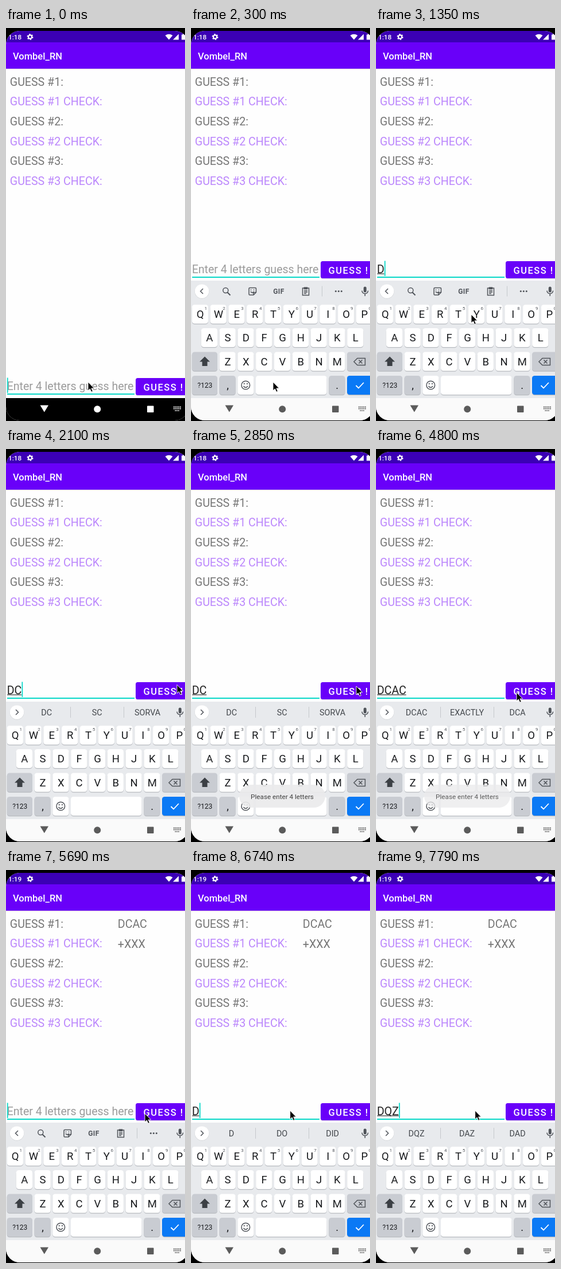
These frames come from a looping animation (312x686 px, 8 s). An HTML page:

```html
<!DOCTYPE html>
<html lang="en">
<head>
<meta charset="utf-8">
<title>Word guess</title>
<style>
  html, body { margin: 0; width: 100%; height: 100%; overflow: hidden; background: #000; }
  svg { display: block; width: 312px; height: 686px; font-family: Roboto, sans-serif; }
  .medium { font-weight: 500; }
  .mid { text-anchor: middle; }
  .line { fill: none; stroke: #50545a; stroke-width: 1.5; }
</style>
</head>
<body>
<svg id="stage" viewBox="0 0 312 686">
  <defs><clipPath id="screen"><rect y="5" width="318" height="680" rx="24"/></clipPath></defs>
  <rect width="312" height="686" fill="#000"/>
  <g clip-path="url(#screen)">
    <rect width="312" height="686" fill="#fefefe"/>
    <rect y="5" width="312" height="20.500" fill="#3b00b5"/>
    <rect y="71" width="312" height="1" fill="#000" opacity=".12"/>
    <rect y="25" width="312" height="46" fill="#6900f9"/>
    <g fill="#fff">
      <text id="clock" x="4" y="20" font-size="11.7" class="medium"></text>
      <circle cx="42" cy="15.500" r="3.100" fill="none" stroke="#fff" stroke-width="2.200"/>
      <circle cx="42" cy="15.500" r="4.700" fill="none" stroke="#fff" stroke-width="1.600" stroke-dasharray="2.4 2.52"/>
      <path d="M277.500 13Q284 8.500 290.500 13L284 20.500ZM291 20.500L301 10.500V20.500ZM306 11.500h2v-1.300h5v10.300h-7Z"/>
      <text x="12" y="54.500" font-size="16.500" class="medium">Vombel_RN</text>
    </g>
    <g id="rows" font-size="19.6"></g>
    <g id="nav">
      <rect id="navBack" y="646" width="312" height="40"/>
      <g id="navIcons">
        <path d="M59.500 658.500H74L66.800 670.500Z"/>
        <circle cx="159.200" cy="665.300" r="6"/>
        <rect x="246" y="659.500" width="11.500" height="11.500" rx="1"/>
        <path d="M292 661.500h13M292 664.500h13M294.500 667.800h8" fill="none" stroke-width="1.800" stroke-dasharray="1.700 1.100"/>
      </g>
    </g>
    <g id="keyboard">
      <rect y="441" width="312" height="205" fill="#e8eaed"/>
      <circle cx="19" cy="460" r="12.500" fill="#c9cbcf"/>
      <circle cx="19" cy="459.500" r="12.300" fill="#fff"/>
      <path id="chevron" class="line"/>
      <g id="tools" class="line">
        <circle cx="60.300" cy="458" r="4.500"/><path d="M63.500 461.500L68.500 466.500" stroke-width="2"/>
        <path d="M102.500 453.500h9.500q1.500 0 1.500 1.500v6.500l-4.500 4.500h-6.500q-1.500 0-1.500-1.500v-9.500q0-1.500 1.500-1.500ZM113.500 461.500h-4.500v4.500M104 460q3 4 5.500 0M104.500 456.500v1.500M109.500 456.500v1.500"/>
        <path d="M194.500 454h11v12.500h-11ZM197.500 453h5v2.500h-5ZM197 458.500h6M197 461h6M197 463.500h4"/>
        <path d="M228.500 450.500v18" stroke="#c5c8cc" stroke-width="1"/>
        <text x="153" y="463.500" font-size="12" font-weight="700" class="mid" fill="#50545a" stroke="none" letter-spacing=".4">GIF</text>
        <g fill="#50545a" stroke="none"><circle cx="252.300" cy="459.500" r="1.500"/><circle cx="257.300" cy="459.500" r="1.500"/><circle cx="262.300" cy="459.500" r="1.500"/></g>
      </g>
      <g id="words" font-size="14.400" fill="#43474c" class="mid">
        <path d="M112.500 450v19M205.500 450v19" stroke="#c5c8cc"/>
      </g>
      <rect x="300.800" y="451.500" width="5" height="10" rx="2.500" fill="#50545a"/>
      <path d="M298 458.500a5.300 5.300 0 0 0 10.600 0M303.300 464v4" class="line"/>
      <g id="keys"></g>
      <path d="M24 573.500L33 582.500H28.500V590H19.500V582.500H15Z" fill="#3c4045"/>
      <path d="M290 576.500h13.500v12H290l-6-6ZM292.500 579.500l6 6M298.500 579.500l-6 6" class="line"/>
      <g class="line"><circle cx="95.300" cy="623.500" r="7.300"/><path d="M91.500 625q3.800 5 7.600 0"/><path d="M92.700 620v2M97.900 620v2" stroke-width="1.800"/></g>
      <path d="M287.500 624L292 628.500L301 619" fill="none" stroke="#fff" stroke-width="1.800"/>
    </g>
    <g id="entry">
      <text id="hint" x="1.700" y="427.500" font-size="19.550" fill="#9b9b9b">Enter 4 letters guess here</text>
      <text id="typed" x="1.700" y="427.500" font-size="19.600" fill="#222"></text>
      <rect id="compose" x="2" y="428.500" height="1.200" fill="#333"/>
      <rect x="2" y="434" width="222" height="2" fill="#08d8c8"/>
      <rect id="caret" y="406.500" width="1.800" height="26.500" fill="#08d8c8"/>
      <rect x="226" y="408" width="92" height="30" rx="3.500" fill="#bbb" opacity=".4"/>
      <rect x="226" y="407" width="92" height="30" rx="3.500" fill="#6900f9"/>
      <rect id="ripple" x="226" y="407" width="92" height="30" rx="3.500" fill="#fff"/>
      <text x="239.500" y="428.500" font-size="16.500" letter-spacing="1.470" fill="#fff" class="medium">GUESS !</text>
    </g>
    <g id="toast">
      <rect x="84" y="586" width="150" height="40" rx="20" fill="#ebebec"/>
      <text x="159" y="610.500" font-size="11.700" fill="#2c2c2c" class="mid">Please enter 4 letters</text>
    </g>
    <path id="mouse" d="M0 0V15L3.400 11.800L5.800 17.300L8.300 16.200L5.900 10.900H10.600Z" fill="#000" stroke="#fff" stroke-width=".9"/>
  </g>
</svg>
<script>
const NS = 'http://www.w3.org/2000/svg';
const LOOP = 8000;
const $ = id => document.getElementById(id);

function add(parent, tag, attrs, text = '') {
  const el = document.createElementNS(NS, tag);
  for (const k in attrs) el.setAttribute(k, attrs[k]);
  el.textContent = text;
  return parent.appendChild(el);
}

// Guess list
for (let i = 0; i < 6; i++) {
  const label = `GUESS #${(i >> 1) + 1}` + (i % 2 ? ' CHECK:' : ':');
  add($('rows'), 'text', { x: 6.8, y: 100.8 + i * 34.6, fill: i % 2 ? '#bb86fc' : '#757575' }, label);
}
const result = add($('rows'), 'g', { fill: '#757575' });
add(result, 'text', { x: 194.8, y: 101.2 }, 'DCAC');
add(result, 'text', { x: 194.8, y: 135.9 }, '+XXX');

// Keyboard
const PITCH = 31.8, GREY = '#c9ccd2';
function key(x, y, w, label = '', fill = '#fff', size = 18.5) {
  const g = $('keys');
  add(g, 'rect', { x, y: y + 1.2, width: w, height: 33, rx: 4.5, fill: '#b8bbc0' });
  add(g, 'rect', { x, y, width: w, height: 33, rx: 4.5, fill });
  if (label) add(g, 'text', { x: x + w / 2 + .4, y: y + 16.5 + size * .36, 'font-size': size, fill: '#17191c', class: 'mid' }, label);
}
function keyRow(letters, x, y) {
  [...letters].forEach((c, i) => key(x + i * PITCH, y, 28.2, c));
}
keyRow('QWERTYUIOP', 1.7, 483);
keyRow('ASDFGHJKL', 17.8, 524);
keyRow('ZXCVBNM', 49.5, 565.5);
for (let i = 0; i < 10; i++)
  add($('keys'), 'text', { x: 25.8 + i * PITCH, y: 491.5, 'font-size': 8, fill: '#50545a', class: 'mid' }, (i + 1) % 10);
key(1.7, 565.5, 44.3, '', GREY);
key(272, 565.5, 46, '', GREY);
key(1.7, 607, 44.3, '?123', GREY, 12);
key(49.5, 607, 28.2, ',', GREY);
key(81.3, 607, 28.2);
key(113, 607, 123.5);
key(240.3, 607, 28.2, '.', GREY);
key(272, 607, 46, '', '#0a79f5');

const words = [70.6, 158.6, 246.6].map(x => add($('words'), 'text', { x, y: 465 }));

// Each step lists only what changes: pos = pointer, under = underlined letters
const steps = [
  [0, { open: 0, caret: 1, pos: [143, 618], text: '', under: 0, words: '', toast: 0, ripple: 0, done: 0, clock: '1:18' }],
  [300, { open: 1, caret: 0 }],
  [750, { caret: 1, pos: [145, 608] }],
  [900, { pos: [146, 566] }],
  [1050, { pos: [143, 522] }],
  [1350, { text: 'D', under: 1, pos: [166, 500] }],
  [1500, { words: 'D DO DID', pos: [198, 474] }],
  [1650, { pos: [236, 448] }],
  [1800, { text: 'DC', pos: [270, 426] }],
  [1950, { under: 2, words: 'DC SC SORVA', pos: [290, 415] }],
  [2100, { pos: [298, 411.5] }],
  [2400, { ripple: .2 }],
  [2550, { ripple: .1, toast: .4 }],
  [2700, { ripple: 0, toast: .9, caret: 0 }],
  [2850, { pos: [288, 414] }],
  [3000, { pos: [266, 417] }],
  [3150, { pos: [238, 419], caret: 1 }],
  [3300, { pos: [208, 418.5] }],
  [3450, { pos: [108.7, 417.5] }],
  [3750, { text: 'DCA' }],
  [4050, { under: 3, words: 'DCA DC DANCE' }],
  [4350, { text: 'DCAC', pos: [124, 419] }],
  [4500, { under: 4, words: 'DCAC EXACTLY DCA', pos: [168, 421] }],
  [4650, { pos: [216, 423] }],
  [4800, { caret: 0, toast: .77, pos: [245, 425] }],
  [4950, { toast: .35 }],
  [5100, { toast: 0 }],
  [5400, { ripple: .2, pos: [242, 425] }],
  [5540, { ripple: .1, text: '', under: 0, words: '', done: 1, caret: 1, clock: '1:19' }],
  [5690, { ripple: 0 }],
  [5840, { pos: [208, 423] }],
  [5990, { pos: [172.7, 420] }],
  [6290, { caret: 0 }],
  [6440, { text: 'D', under: 1, caret: 1 }],
  [6740, { words: 'D DO DID' }],
  [6890, { text: 'DQ' }],
  [7040, { under: 2, words: 'DQ DA DAQ' }],
  [7490, { text: 'DQZ' }],
  [7790, { under: 3, words: 'DQZ DAZ DAD' }]
];

const show = (el, on) => el.setAttribute('visibility', on ? 'visible' : 'hidden');

function draw(s) {
  const typed = $('typed');
  const suggest = s.words !== '';
  const ink = s.open ? '#5b5b5b' : '#fff';
  $('clock').textContent = s.clock;
  show(result, s.done);
  show($('keyboard'), s.open);
  $('entry').setAttribute('transform', `translate(0 ${s.open ? 0 : 204})`);
  $('navBack').setAttribute('fill', s.open ? '#fafafa' : '#000');
  $('navIcons').setAttribute('fill', ink);
  $('navIcons').setAttribute('stroke', ink);
  $('navIcons').setAttribute('stroke-width', 0);
  $('chevron').setAttribute('d', suggest ? 'M17 455L21.500 459.500L17 464' : 'M21 455L16.500 459.500L21 464');
  $('tools').setAttribute('display', suggest ? 'none' : 'inline');
  $('words').setAttribute('display', suggest ? 'inline' : 'none');
  s.words.split(' ').forEach((w, i) => words[i].textContent = w);
  typed.textContent = s.text;
  show($('hint'), !s.text);
  $('compose').setAttribute('width', s.under ? typed.getSubStringLength(0, s.under) - .5 : 0);
  $('caret').setAttribute('x', 1.8 + (s.text ? typed.getComputedTextLength() : 0));
  show($('caret'), s.caret);
  $('ripple').setAttribute('opacity', s.ripple);
  $('toast').setAttribute('opacity', s.toast);
  $('mouse').setAttribute('transform', `translate(${s.pos})`);
}

const start = performance.now();
let last = -1;
function tick() {
  const t = (performance.now() - start) % LOOP;
  const past = steps.filter(([at]) => at <= t);
  if (past.length !== last) {
    last = past.length;
    draw(Object.assign({}, ...past.map(step => step[1])));
  }
  requestAnimationFrame(tick);
}
tick();
</script>
</body>
</html>
```
